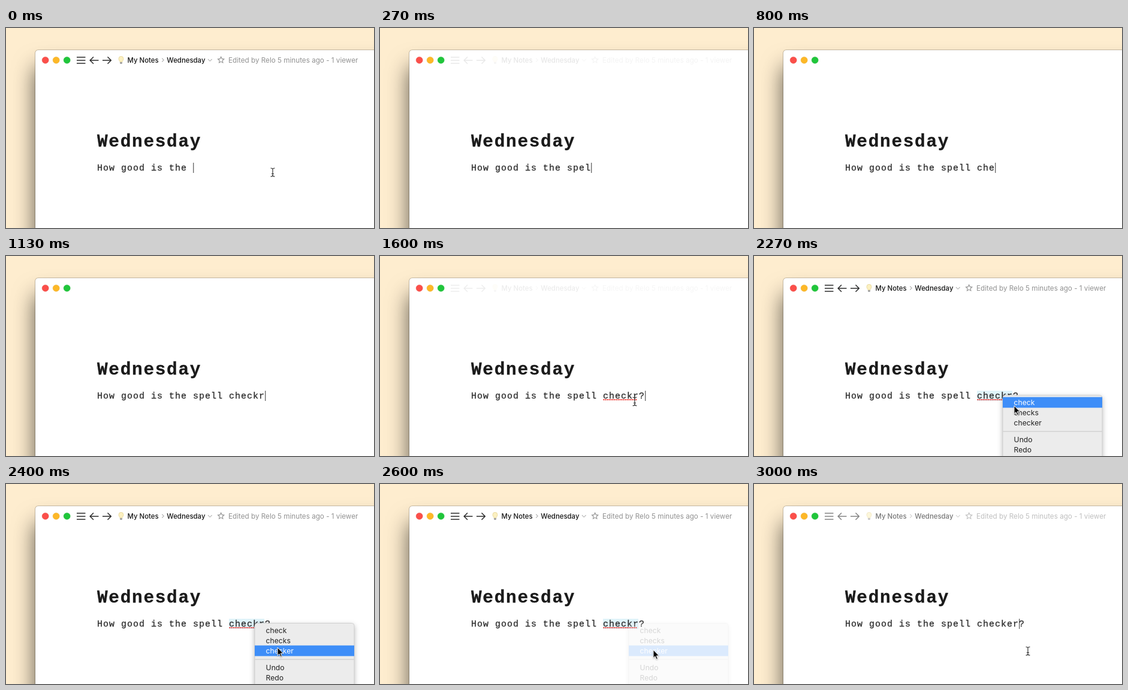
An HTML page that plays this animation: 614 by 334 pixels, repeating every 3.07 s.

```html
<!DOCTYPE html>
<html lang="en">
<head>
<meta charset="utf-8">
<title>Spell check</title>
<style>
  html, body { margin: 0; width: 100%; height: 100%; overflow: hidden; }
  #stage { position: relative; width: 614px; height: 334px; overflow: hidden; contain: strict; background: #feedcf; }
  #window {
    position: absolute; left: 49px; top: 37px; width: 700px; height: 500px;
    background: #fff; border-radius: 5px 0 0 0;
    box-shadow: 0 0 0 1px rgba(0,0,0,.2), 0 28px 36px rgba(0,0,0,.64);
  }
  svg { position: absolute; left: 0; top: 0; }
  text { font: 12.2px Inter, sans-serif; fill: #222; white-space: pre; }
  #toolbar text { font-size: 11.7px; fill: #929292; }
  #toolbar .crumb { font-size: 11.4px; font-weight: 500; fill: #161616; }
  .line { fill: none; stroke: #2b2b2b; stroke-width: 1.5; }
  .faint { fill: none; stroke: #b4b4b4; stroke-width: 1.1; }
  #heading { font: bold 29.5px "Liberation Mono", monospace; letter-spacing: 1.65px; fill: #1a1a1a; stroke: #1a1a1a; stroke-width: .3; }
  #body { font: 15px "Liberation Mono", monospace; letter-spacing: 1px; fill: #2a2a2a; stroke: #2a2a2a; stroke-width: .3; }
  #panel { fill: #ececec; stroke: #c4c4c4; stroke-width: .7; filter: drop-shadow(0 3px 4px rgba(0,0,0,.28)); }
  #arrow { stroke: #fff; filter: drop-shadow(0 1px 1px rgba(0,0,0,.3)); }
</style>
</head>
<body>
<div id="stage">
<div id="window"></div>
<svg width="614" height="334" viewBox="0 0 614 334">
  <g stroke-width=".5">
    <circle cx="65.7" cy="53.7" r="5.5" fill="#fb4f4a" stroke="#e8443f"/>
    <circle cx="83.7" cy="53.7" r="5.5" fill="#fdb827" stroke="#e8a825"/>
    <circle cx="101.7" cy="53.7" r="5.5" fill="#20c63b" stroke="#1bb433"/>
  </g>

  <g id="toolbar">
    <path class="line" d="M118 48.700h14.500M118 53.900h14.500M118 59.100h14.500"/>
    <path class="line" d="M154.500 54H140.500M146 48.200L140.200 54L146 59.800M161 54H175M169.500 48.200L175.300 54L169.500 59.800"/>
    <path d="M190 56.500C190 55 188 54 188 51.300A4 4 0 0 1 196 51.300C196 54 194 55 194 56.500Z" fill="#fbf0c0" stroke="#e6d596" stroke-width=".8"/>
    <path d="M190 57h4v2l-1 1h-2l-1-1Z" fill="#a5a5a5"/>
    <text class="crumb" x="202.500" y="57.500">My Notes</text>
    <path class="faint" d="M260.300 50.500l3 3l-3 3"/>
    <text class="crumb" x="268.300" y="57.500">Wednesday</text>
    <path class="faint" d="M337 52l3.300 3.300l3.300-3.300"/>
    <path id="star" class="faint" style="stroke: #929292"/>
    <text x="371" y="57.500">Edited by Relo 5 minutes ago - 1 viewer</text>
  </g>

  <text id="heading" x="152" y="198">Wednesday</text>
  <rect id="selection" x="372" y="225" width="59" height="17" fill="#e0f4fa"/>
  <text id="body" x="152" y="238"></text>
  <path id="squiggle" d="M373.300 240H430" stroke="#ee2b24" stroke-width="2" stroke-linecap="round" stroke-dasharray=".3 2.700"/>
  <rect id="caret" y="225" width="1" height="17" fill="#333"/>

  <g id="menu">
    <rect id="panel" x="415" y="232.500" width="166" height="140" rx="4"/>
    <rect id="highlight" x="415" width="166" height="17.800" fill="#3e8ef8"/>
    <path d="M415 293H581" stroke="#d2d2d2" stroke-width="1.500"/>
  </g>

  <path id="beam" fill="none" stroke="#333" stroke-width="1.200"
    d="M-3.500-7Q0-7 0-5V5Q0 7-3.500 7M3.500-7Q0-7 0-5M0 5Q0 7 3.500 7M-2 2.500H2"/>
  <path id="arrow" d="M0 0V13.500L3 10.700L5.200 15.600L7.400 14.700L5.300 9.900H9.500Z"/>
</svg>
</div>

<script>
const LOOP = 3070, TICK = 200 / 3, LAST_TICK = 45;
const ORIGIN = 152, PITCH = 10;
const TYPED = "How good is the spell checkr?", FIXED = "How good is the spell checker?";
const KEY_TICKS = [1, 2, 3, 4, 5, 7, 8, 9, 12, 14, 15, 17, 21];
const OPENED = 30, CORRECTED = 40;
const ROWS = [["check", 236], ["checks", 253], ["checker", 270], ["Undo", 298], ["Redo", 315]];

const $ = id => document.getElementById(id);
const show = (id, on) => $(id).style.display = on ? "" : "none";
const place = (id, [x, y]) => $(id).setAttribute("transform", `translate(${x} ${y})`);

// Keys are [tick, ...numbers], interpolated linearly.
function track(keys, n) {
  const i = keys.findIndex(k => k[0] > n);
  if (i < 0) return keys[keys.length - 1].slice(1);
  if (i === 0) return keys[0].slice(1);
  const a = keys[i - 1], b = keys[i], p = (n - a[0]) / (b[0] - a[0]);
  return a.slice(1).map((v, j) => v + (b[j + 1] - v) * p);
}

const TOOLBAR = [[0, 1], [1, .8], [4, .1], [5, 0], [23, 0], [24, .08], [27, .85], [28, 1], [44, 1], [45, .58]];
const BEAM = [[0, 445, 241], [23, 445, 241], [24, 425, 243], [28, 415, 239], [40, 415, 239], [41, 457, 279]];
const ARROW = [[33, 414, 234], [34, 434, 250], [36, 453, 273], [37, 456, 277]];

const starPoints = Array.from({ length: 10 }, (_, i) => {
  const r = i % 2 ? 2.6 : 5.4, a = i * Math.PI / 5;
  return [358.7 + r * Math.sin(a), 53.5 - r * Math.cos(a)];
});
$("star").setAttribute("d", "M" + starPoints.join("L") + "Z");

const labels = ROWS.map(([word, y]) => {
  const label = document.createElementNS("http://www.w3.org/2000/svg", "text");
  label.setAttribute("x", 433.6);
  label.setAttribute("y", y + 12.8);
  label.textContent = word;
  return $("menu").appendChild(label);
});

function draw(n) {
  const corrected = n >= CORRECTED;
  const selecting = n >= 29 && !corrected;
  const typed = 16 + KEY_TICKS.filter(k => k <= n).length;

  $("toolbar").style.opacity = track(TOOLBAR, n)[0];
  $("body").textContent = corrected ? FIXED : TYPED.slice(0, typed);
  $("caret").setAttribute("x", ORIGIN + PITCH * typed + .3);
  show("caret", !selecting);
  show("selection", selecting);
  show("squiggle", n >= 21 && !corrected);

  show("menu", n >= OPENED && !corrected);
  $("menu").style.opacity = n >= 39 ? .18 : 1;
  const pointer = track(ARROW, n);
  const active = n < 34 ? -1 : ROWS.findIndex(([, y]) => pointer[1] >= y && pointer[1] < y + 17);
  show("highlight", active >= 0);
  if (active >= 0) $("highlight").setAttribute("y", ROWS[active][1] - .4);
  labels.forEach((label, i) => label.style.fill = i === active ? "#fff" : "");

  show("arrow", n >= 29 && n <= CORRECTED);
  place("arrow", pointer);
  show("beam", n < 1 || (n >= 24 && n < 29) || n > CORRECTED);
  place("beam", track(BEAM, n));
}

const start = performance.now();
function frame() {
  const t = (performance.now() - start) % LOOP;
  draw(Math.min(LAST_TICK, Math.floor((t + 4) / TICK)));
  requestAnimationFrame(frame);
}
frame();
</script>
</body>
</html>
```
